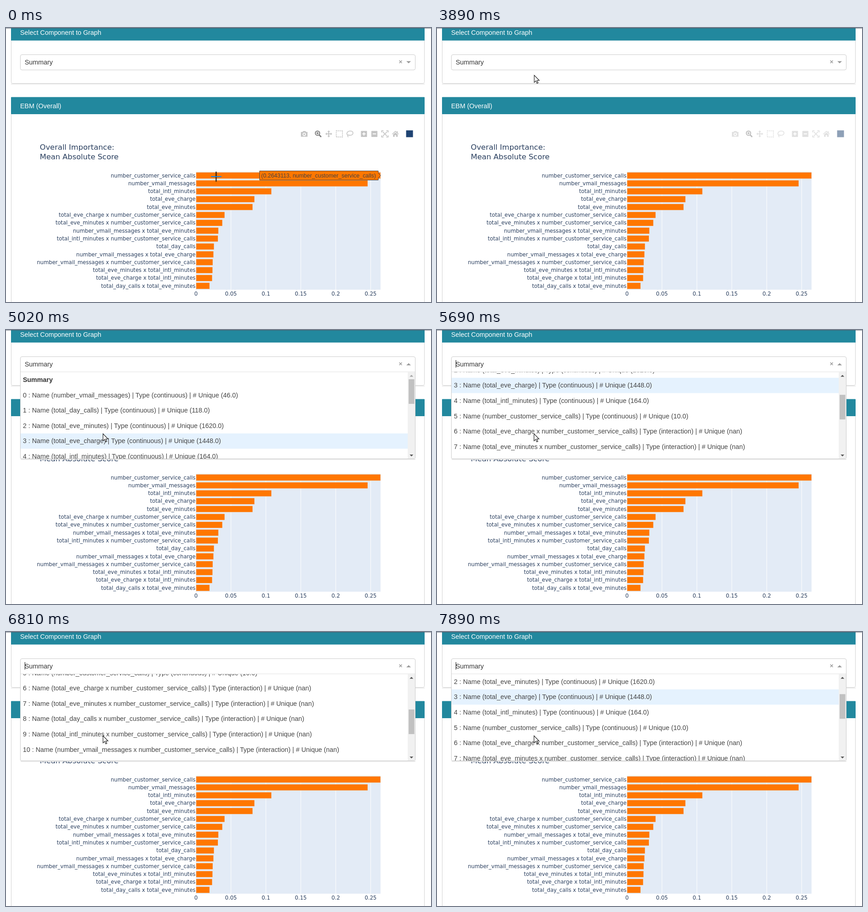
Write an HTML page that moves like this. It is 931 px wide and 601 px high and loops after 8 s.

```html
<!DOCTYPE html>
<html lang="en">
<head>
<meta charset="utf-8">
<title>Component importance</title>
<style>
  html, body { margin: 0; width: 100%; height: 100%; overflow: hidden; background: #fff; }
  svg { display: block; width: 931px; height: 601px; }
  text { font: 14.35px "Liberation Sans", Arial, sans-serif; fill: #333; white-space: pre; }
  .chart text { font: 11.67px "DejaVu Sans", Verdana, sans-serif; fill: #2a3f5f; }
  .chart .title { font-size: 16.4px; }
  .head { fill: #fff; }
  .list text { fill: #444; }
  .tip text { font-size: 12.44px; fill: #444; }
  .card { fill: #fff; stroke: #d2d2d2; }
  .teal { fill: #22889e; }
</style>
</head>
<body>
<svg viewBox="0 0 931 601">
  <defs>
    <clipPath id="view"><rect x="32" y="92.5" width="848" height="190"/></clipPath>
  </defs>

  <rect x="11" y="122" width="906" height="2" fill="#ececec"/>
  <rect class="card" x="11.5" y="-9.5" width="905" height="131" rx="3"/>
  <rect class="teal" x="11" y="0" width="906" height="27.5"/>
  <rect width="931" height="1.5" fill="#4b5560" opacity=".5"/>
  <text class="head" x="31" y="14.5">Select Component to Graph</text>

  <rect class="card" x="11.5" y="152.5" width="905" height="470" rx="3"/>
  <rect class="teal" x="11" y="151.5" width="906" height="37.5" rx="1"/>
  <text class="head" x="31" y="175.8">EBM (Overall)</text>

  <g class="chart" id="chart">
    <text class="title" x="74" y="267">Overall Importance:</text>
    <text class="title" x="74" y="288">Mean Absolute Score</text>
    <rect x="416" y="315.5" width="404.5" height="258.5" fill="#e3ebf6"/>
  </g>

  <g class="tip" id="tip">
    <path d="M555.5 313.5H815.5V318.5L820.8 323.5L815.5 328.5V333.5H555.5Z" fill="#ff7700" stroke="#444"/>
    <text x="559" y="328.3">(0.2643113, number_customer_service_calls)</text>
  </g>

  <g id="modebar" fill="#c5c5c5" stroke="#c5c5c5" stroke-width="0">
    <path fill-rule="evenodd" d="M646 228H649.5L651 226H656L657.5 228H660.5V238.5H646ZM653.3 229.5A3.7 3.7 0 1 0 653.4 229.5ZM653.3 231.3A2 2 0 1 1 653.2 231.3Z"/>
    <g fill="none" stroke="#7c7c7c">
      <circle cx="682.4" cy="230.7" r="4.8" stroke-width="2"/>
      <path d="M686 234.5L690.5 239" stroke-width="2.6"/>
      <path d="M680 230.7H685M682.4 228.3V233.2" stroke-width="1.8"/>
    </g>
    <path d="M707 224.5L710 228H708V231.2H711.2V229.3L714.5 232.2L711.2 235.2V233.2H708V236.5H710L707 240L704 236.5H706V233.2H702.8V235.2L699.5 232.2L702.8 229.3V231.2H706V228H704Z"/>
    <rect x="723.5" y="225.5" width="13.5" height="13.5" fill="none" stroke-width="1.8" stroke-dasharray="2.2 1.6"/>
    <path d="M749 235C744 232 748 226 754 226C762 226 762 234 755 235.2C751 236 750 233.5 748.5 235.2C747.5 236.8 750 237.5 749.3 239.5" fill="none" stroke-width="1.6"/>
    <rect x="777.5" y="225.7" width="13.3" height="13.3" rx="1"/>
    <rect x="800.3" y="225.7" width="13.3" height="13.3" rx="1"/>
    <path d="M780.5 232.3H787.8M784.1 228.7V236M803.3 232.3H810.6" stroke="#fff" stroke-width="2"/>
    <path d="M823 229V225.3H827M833 225.3H837V229M837 235.5V239.2H833M827 239.2H823V235.5M825.5 227.8L834.5 236.8M834.5 227.8L825.5 236.8" fill="none" stroke-width="1.8"/>
    <path d="M845.5 232.5L853 225.5L856 228.2V226.5H858V230L860.5 232.5L859.5 233.5L853 227.8L846.5 233.5ZM848 233.5L853 229.2L858 233.5V238.8H854.6V235H851.4V238.8H848Z"/>
    <rect x="876.5" y="224.5" width="15" height="15" fill="#1f4372"/>
  </g>

  <rect x="31.5" y="58.5" width="865" height="33.5" rx="3.5" fill="#fff" stroke="#ccc"/>
  <text x="41" y="80">Summary</text>
  <path d="M861.5 71.2L867.3 77M867.3 71.2L861.5 77" stroke="#999" stroke-width="1.5"/>
  <path id="arrow" fill="#999"/>

  <g class="list" id="menu">
    <rect x="32" y="283" width="865" height="1.5" fill="#e4e4e4"/>
    <path d="M31.5 88V280Q31.5 282.5 34 282.5H894Q896.5 282.5 896.5 280V88" fill="#fff" stroke="#ccc"/>
    <path d="M32 91.8H896" stroke="#e2e2e2"/>
    <g clip-path="url(#view)"><g id="rows"><rect id="hot" x="32" width="848" height="33.6" fill="#e5f2fe"/></g></g>
    <rect x="880" y="92.5" width="16" height="189.5" fill="#f1f1f1"/>
    <rect id="thumb" x="882" width="12.5" height="54" fill="#c1c1c1"/>
    <path id="up" d="M884.2 102.5L888.2 98.5L892.2 102.5Z"/>
    <path d="M884.2 273.2L888.2 277.2L892.2 273.2Z" fill="#505050"/>
    <path id="caret" d="M41.5 66V82.5" stroke="#000"/>
  </g>

  <g id="cross" fill="none" stroke-width="2">
    <path d="M460.3 315V337" stroke="#111"/>
    <path d="M449 326H472" stroke="#0a84f0"/>
  </g>
  <path id="pointer" d="M.5 .5V16.3L4.2 12.9L6.6 18.4L9 17.3L6.7 12H11.5Z" fill="#fff" stroke="#111" stroke-width="1.1"/>
</svg>

<script>
const LOOP = 8000, ROW = 33.6, LIST_TOP = 92.4, OPEN_AT = 4310;
const el = id => document.getElementById(id);

function add(parent, tag, attrs, content = '') {
  const node = document.createElementNS('http://www.w3.org/2000/svg', tag);
  for (const key in attrs) node.setAttribute(key, attrs[key]);
  node.textContent = content;
  return parent.appendChild(node);
}

const service = 'number_customer_service_calls', vmail = 'number_vmail_messages',
  intl = 'total_intl_minutes', charge = 'total_eve_charge',
  minutes = 'total_eve_minutes', day = 'total_day_calls';
const pair = (a, b) => `${a} x ${b}`;

// Bar chart: label and right edge of each bar
const bars = [
  [service, 820.5], [vmail, 792.3], [intl, 581.5], [charge, 544.3], [minutes, 540.2],
  [pair(charge, service), 479], [pair(minutes, service), 474], [pair(vmail, minutes), 465.3],
  [pair(intl, service), 464.3], [day, 455.8], [pair(vmail, charge), 454.7],
  [pair(vmail, service), 453], [pair(minutes, intl), 452.6], [pair(charge, intl), 451.8],
  [pair(day, minutes), 446]
];
const chart = el('chart');
for (let i = 0; i <= 5; i++) {
  const x = 416.3 + i * 76.5;
  if (i) add(chart, 'path', { d: `M${x} 315.5V574`, stroke: '#fff' });
  add(chart, 'text', { x, y: 586.5, 'text-anchor': 'middle' }, String(i * 5 / 100));
}
bars.forEach(([label, end], i) => {
  const y = 323.6 + i * 17.29;
  add(chart, 'rect', { x: 416.3, y: y - 6.9, width: end - 416.3, height: 13.8,
    fill: '#ff7700', stroke: '#e3ebf6', 'stroke-width': .5 });
  add(chart, 'text', { x: 415.2, y: y + 4, 'text-anchor': 'end' }, label);
});

// Menu options
const single = [[vmail, 46], [day, 118], [minutes, 1620], [charge, 1448], [intl, 164], [service, 10]]
  .map(([name, count]) => `Name (${name}) | Type (continuous) | # Unique (${count}.0)`);
const joint = [
  ...[charge, minutes, day, intl, vmail].map(name => pair(name, service)),
  pair(minutes, charge), pair(vmail, minutes), pair(vmail, charge), pair(minutes, intl), pair(charge, intl)
].map(name => `Name (${name}) | Type (interaction) | # Unique (nan)`);
const options = ['Summary', ...[...single, ...joint].map((line, i) => `${i} : ${line}`)];
options.forEach((line, i) => add(el('rows'), 'text', {
  x: 37, y: LIST_TOP + i * ROW + 21.6, 'font-weight': 400,
  style: i ? '' : 'font-weight:bold;fill:#333'
}, line));

// Moments at which the picture is refreshed
const ticks = [0, 1000, 1120, 1270, 1390, 1510, 1630,
  2030, 2180, 2300, 2450, 2570, 2720, 2840, 2960,
  3080, 3230, 3350, 3500, 3620, 3770, 3890, 4010,
  4160, 4310, 4460, 4750, 4900, 5020,
  5300, 5420, 5570, 5690, 5840, 5990, 6140,
  6540, 6690, 6810, 6930, 7070, 7210, 7350, 7470, 7620, 7770, 7890];

// Tracks: time followed by values
const path = [[1000, 430, 285], [1270, 330, 150], [1390, 302, 64], [1630, 298, 76],
  [2030, 307, 118], [2300, 305, 200], [2720, 283, 325], [2840, 281, 336], [2960, 284, 330],
  [3230, 270, 300], [3620, 225, 200], [3770, 214, 130], [3890, 212.5, 103], [4010, 212, 99],
  [4160, 212, 82], [4310, 212, 80], [4460, 212, 118], [4750, 212, 170], [5020, 212, 227]];
const fade = [[1120, 1], [1390, 0], [2300, 0], [2570, 1], [3620, 1], [3890, .5], [4010, 0]];
const scrolling = [[5020, 0], [5300, 12], [5570, 95], [5690, 122], [5840, 180], [5990, 197], [6140, 200],
  [6690, 202], [6810, 221], [6930, 275], [7070, 300], [7210, 285], [7350, 225], [7470, 200],
  [7620, 190], [7770, 125], [7890, 101]];

function sample(track, t) {
  const next = track.findIndex(key => key[0] > t);
  if (next === 0) return track[0].slice(1);
  if (next < 0) return track[track.length - 1].slice(1);
  const a = track[next - 1], b = track[next], k = (t - a[0]) / (b[0] - a[0]);
  return a.slice(1).map((v, i) => v + (b[i + 1] - v) * k);
}

const show = (id, on) => { el(id).style.display = on ? '' : 'none'; };

function draw(now) {
  const t = ticks.filter(tick => tick <= now).pop();
  const [x, y] = sample(path, t), [scroll] = sample(scrolling, t), open = t >= OPEN_AT;

  show('tip', t < 1000);
  show('cross', t < 1000);
  show('pointer', t >= 1000);
  el('pointer').setAttribute('transform', `translate(${x} ${y})`);
  el('modebar').style.opacity = sample(fade, t)[0];

  show('menu', open);
  el('arrow').setAttribute('d', open ? 'M877 77.5L882 72.7L887 77.5Z' : 'M877 72.7L882 77.5L887 72.7Z');
  show('caret', Math.max(0, Math.floor((t - 4460) / 530)) % 2 === 0);
  el('rows').setAttribute('transform', `translate(0 ${-scroll})`);
  el('hot').setAttribute('y', LIST_TOP + ROW * Math.max(0, Math.floor((y - LIST_TOP) / ROW)));
  el('thumb').setAttribute('y', 108 + scroll * .28);
  el('up').setAttribute('fill', scroll ? '#505050' : '#a3a3a3');
}

const start = performance.now();
function loop() {
  draw((performance.now() - start) % LOOP);
  requestAnimationFrame(loop);
}
loop();
</script>
</body>
</html>
```
